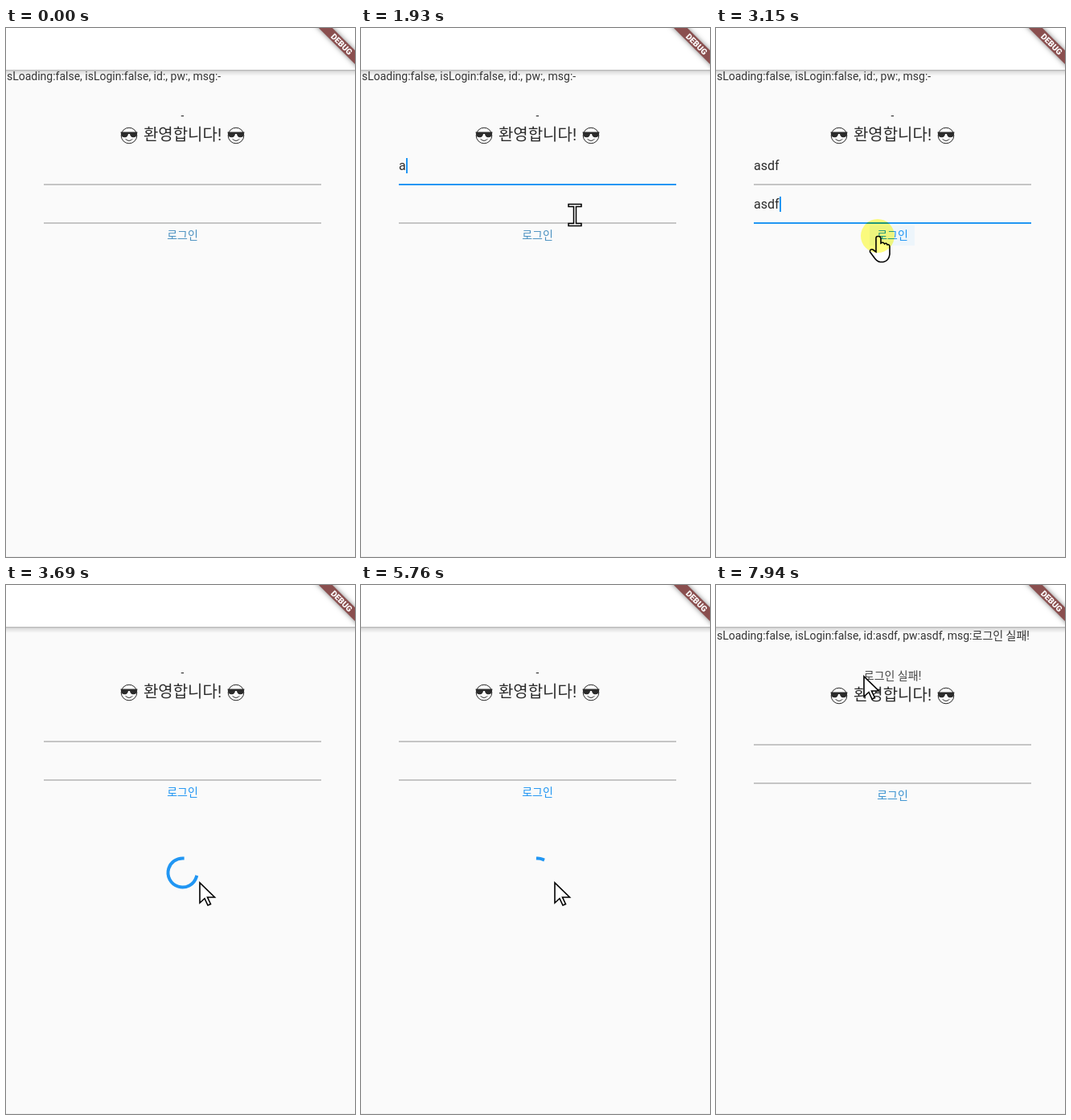
These frames come from a looping animation (434 px wide and 659 px high, 8000 ms). An HTML page with a canvas:

```html
<!DOCTYPE html>
<html lang="ko">
<head>
<meta charset="utf-8">
<title>Login</title>
<style>
html, body { margin: 0; width: 434px; height: 659px; overflow: hidden; background: #fafafa; }
canvas { display: block; }
</style>
</head>
<body>
<canvas id="stage" width="434" height="659"></canvas>
<script>
const ctx = document.getElementById('stage').getContext('2d');
const LOOP = 8000, BLUE = '#2196f3', INK = '#2b2b2b';
const FONT = 'Roboto, "Noto Sans CJK KR", "Noto Sans CJK", sans-serif';
const CENTER = 219.5;
const LOADING = 3220, FAILED = 6370;

// time, shape, x, y
const pointerSteps = [
  [0, null, 0, 0],
  [500, 'beam', 371, 234], [570, 'beam', 345, 217], [640, 'beam', 320, 191], [710, 'beam', 311, 182],
  [1520, 'beam', 303, 195], [1590, 'beam', 280, 222], [1660, 'beam', 266, 233],
  [3020, 'beam', 248, 240], [3080, 'hand', 212, 255], [3150, 'hand', 201, 259],
  [3290, 'arrow', 212, 290], [3350, 'arrow', 228, 335], [3420, 'arrow', 238, 365], [3490, 'arrow', 241, 371],
  [7300, 'arrow', 237, 335], [7370, 'arrow', 229, 245], [7440, 'arrow', 221, 150], [7510, 'arrow', 214, 55],
  [7580, 'arrow', 208, 2], [7650, 'arrow', 204, 15], [7720, 'arrow', 188, 80], [7800, 'arrow', 177, 129],
  [7940, 'arrow', 184, 114]
];
const clicks = [[980, 1190], [2400, 2540], [3150, 3290]];
const typing = [[1930, 2000, 2130, 2200], [2740, 2810, 2880, 2950]];

const clamp = v => Math.max(0, Math.min(1, v));
const between = (t, a, b) => t >= a && t < b;

function text(str, x, y, size, color, align = 'left', weight = 400) {
  ctx.font = `${weight} ${size}px ${FONT}`;
  ctx.fillStyle = color;
  ctx.textAlign = align;
  ctx.fillText(str, x, y);
}

function rect(x, y, w, h, color) {
  ctx.fillStyle = color;
  ctx.fillRect(x, y, w, h);
}

function coolFace(x, y) {
  ctx.save();
  ctx.translate(x, y);
  ctx.strokeStyle = ctx.fillStyle = INK;
  ctx.lineWidth = 1;
  ctx.beginPath();
  ctx.arc(0, 0, 9.8, 0, 7);
  ctx.stroke();
  ctx.beginPath();
  ctx.moveTo(-10.5, -4.5);
  ctx.lineTo(10.5, -4.5);
  ctx.lineTo(9.6, 0);
  ctx.quadraticCurveTo(8.5, 2.5, 5, 2.3);
  ctx.quadraticCurveTo(1.6, 2, 1, -2);
  ctx.lineTo(-1, -2);
  ctx.quadraticCurveTo(-1.6, 2, -5, 2.3);
  ctx.quadraticCurveTo(-8.5, 2.5, -9.6, 0);
  ctx.fill();
  ctx.beginPath();
  ctx.arc(0, 1.2, 5.2, 0.6, Math.PI - 0.6);
  ctx.stroke();
  ctx.restore();
}

function appBar() {
  const shade = ctx.createLinearGradient(0, 52, 0, 60);
  shade.addColorStop(0, 'rgba(0,0,0,.29)');
  shade.addColorStop(0.3, 'rgba(0,0,0,.11)');
  shade.addColorStop(1, 'rgba(0,0,0,0)');
  rect(0, 52, 434, 8, shade);
  rect(0, 0, 434, 52, '#fff');
}

function debugBanner() {
  ctx.save();
  ctx.translate(441.5, -4);
  ctx.rotate(Math.PI / 4);
  ctx.shadowColor = 'rgba(0,0,0,.5)';
  ctx.shadowBlur = 6;
  rect(-40, 28, 80, 12, '#8a4f4f');
  ctx.shadowColor = 'transparent';
  text('DEBUG', 0, 37.7, 10.2, '#fff', 'center', 900);
  ctx.restore();
}

function field(top, value, focus, caret) {
  rect(47, top + 32, 345, 2, '#c5c5c5');
  ctx.globalAlpha = focus;
  rect(47, top + 32, 345, 2, BLUE);
  ctx.globalAlpha = 1;
  text(value, 47, top + 15, 16, INK);
  if (caret) rect(47 + Math.round(ctx.measureText(value).width), top, 2, 19, BLUE);
}

// Material "fast out, slow in" curve: cubic-bezier(.4, 0, .2, 1)
function ease(x) {
  let lo = 0, hi = 1, s = x;
  for (let i = 0; i < 20; i++) {
    s = (lo + hi) / 2;
    const bx = 1.2 * s * (1 - s) ** 2 + 0.6 * s * s * (1 - s) + s ** 3;
    if (bx < x) lo = s; else hi = s;
  }
  return s * s * (3 - 2 * s);
}

function spinner(t) {
  const shown = 3560 + Math.floor((t - 3550) / 68.5) * 68.5;
  const ms = Math.max(0, (shown - 3213) * 0.964);
  const phase = ms / 1333 % 1, turn = ms / 2222 % 1;
  const head = ease(clamp(phase * 2)), tail = ease(clamp(phase * 2 - 1));
  const start = Math.PI * (-0.5 + tail * 1.5 + turn * 2 + phase * 0.5);
  ctx.strokeStyle = BLUE;
  ctx.lineWidth = 4;
  ctx.lineCap = 'square';
  ctx.beginPath();
  ctx.arc(CENTER, 358.5, 18, start, start + Math.max((head - tail) * 1.5 * Math.PI, 0.01));
  ctx.stroke();
  ctx.lineCap = 'butt';
}

const arrow = new Path2D('M0 0V25L6 19.5L10 28L13.5 26.5L9.5 18H18.5Z');
const hand = new Path2D('M-2 3Q-2 0 1 .5Q4 .5 4 4V9Q7 7 8.5 10Q11 8 12 11Q15 10 15 14V23Q14 31 7 32.5H3' +
  'Q-1 32 -5 26L-9.5 20Q-10 16 -6 17L-2 20Z');
const beam = new Path2D('M-6.5 -12H6.5M0 -12V12M-6.5 12H6.5');

function pointer(t) {
  const [, kind, x, y] = pointerSteps.filter(step => step[0] <= t).pop();
  if (!kind) return;
  ctx.save();
  ctx.translate(x, y);
  if (kind === 'beam') {
    ctx.lineCap = 'square';
    for (const [color, width] of [['#000', 4.5], ['#fff', 1.5]]) {
      ctx.strokeStyle = color;
      ctx.lineWidth = width;
      ctx.stroke(beam);
    }
  } else {
    const shape = kind === 'hand' ? hand : arrow;
    ctx.fillStyle = '#fff';
    ctx.strokeStyle = '#000';
    ctx.lineWidth = 1.6;
    ctx.fill(shape);
    ctx.stroke(shape);
  }
  if (clicks.some(([a, b]) => between(t, a, b))) {
    ctx.globalCompositeOperation = 'multiply';
    ctx.fillStyle = '#ffff80';
    ctx.beginPath();
    ctx.arc(0, 0, 21, 0, 7);
    ctx.fill();
  }
  ctx.restore();
}

function draw(t) {
  const loading = between(t, LOADING, FAILED), failed = t >= FAILED;
  const drop = failed ? 4 : 0;
  const sent = t >= LOADING;
  const typed = i => sent ? '' : 'asdf'.slice(0, typing[i].filter(k => k <= t).length);

  rect(0, 0, 434, 659, '#fafafa');
  rect(0, 658, 434, 1, '#f0f0f0');
  appBar();
  debugBanner();

  if (failed) text('isLoading:false, isLogin:false, id:asdf, pw:asdf, msg:로그인 실패!', -2.5, 68, 14, '#333');
  else if (!loading) text('isLoading:false, isLogin:false, id:, pw:, msg:-', -2.5, 65, 14, '#333');

  if (failed) text('로그인 실패!', CENTER, 118, 14, '#444', 'center');
  else text('-', CENTER, 114, 14, INK, 'center');

  coolFace(153, 134 + drop);
  coolFace(286, 134 + drop);
  text('환영합니다!', CENTER, 140 + drop, 20, INK, 'center');

  const first = t < 2400 ? clamp((t - 940) / 200) : 1 - clamp((t - 2360) / 150);
  const second = sent ? 0 : clamp((t - 2360) / 150);
  field(162 + drop, typed(0), first, between(t, 980, 1520) || between(t, 1930, 2400));
  field(210 + drop, typed(1), second, between(t, 2400, LOADING));

  if (between(t, 3080, 3290)) rect(191, 246, 56, 25, '#edf5fb');
  const loginColor = failed ? '#3a92d0' : t < 3080 ? '#4b91c0' : BLUE;
  text('로그인', CENTER, 263 + drop, 14, loginColor, 'center');

  if (loading) spinner(t);
  pointer(t);
}

const begin = performance.now();
function tick() {
  draw((performance.now() - begin) % LOOP);
  requestAnimationFrame(tick);
}
tick();
</script>
</body>
</html>
```
